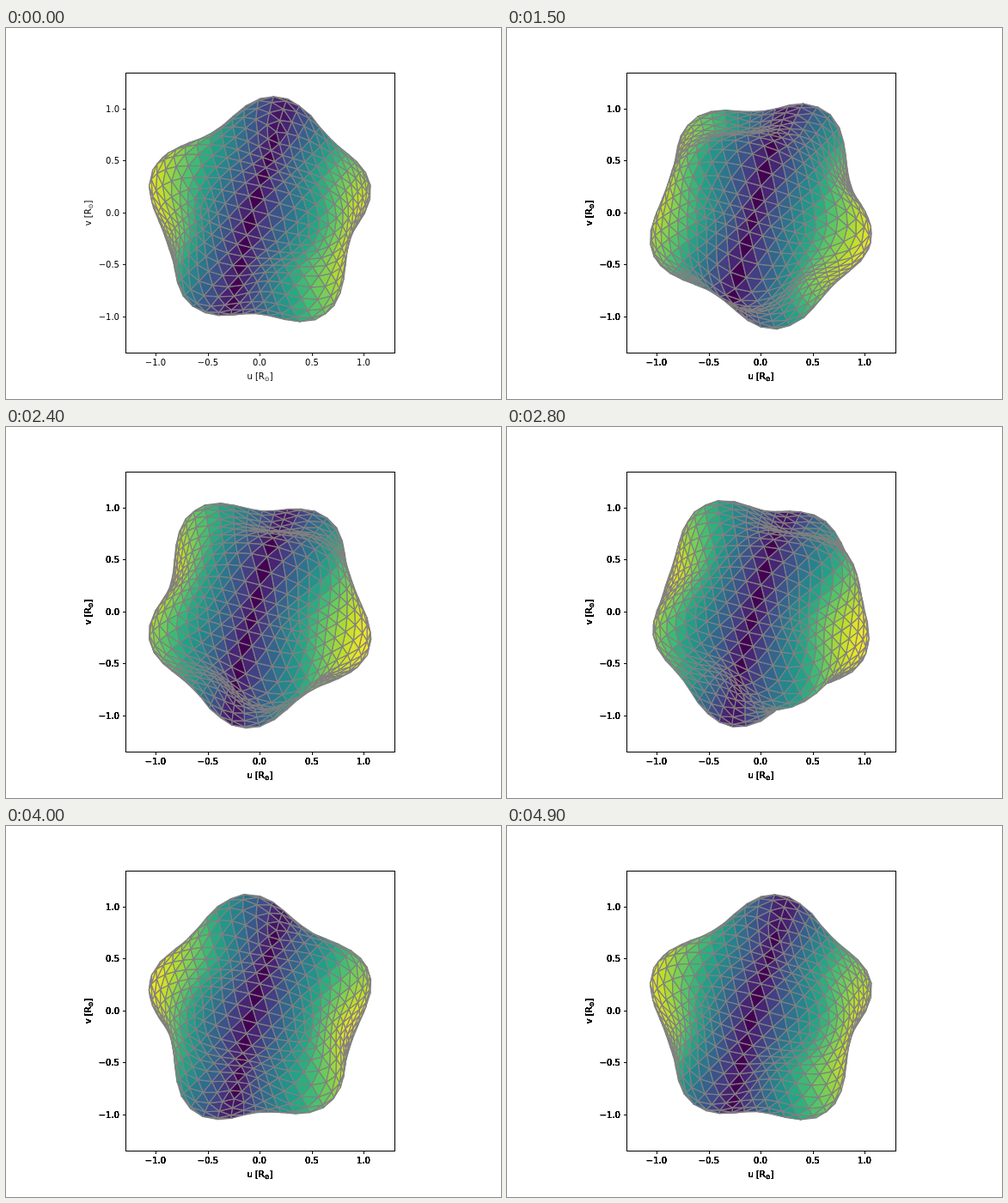
Recreate the animation shown at these times as an HTML page with a canvas. Size 576 by 432 pixels, loop 5 s.

```html
<!DOCTYPE html>
<html lang="en">
<head>
<meta charset="utf-8">
<title>Pulsating star mesh</title>
<style>
  html, body { margin: 0; width: 100%; height: 100%; overflow: hidden; background: #fff; }
  canvas, svg { position: absolute; left: 0; top: 0; width: 576px; height: 432px; }
  text { font: 10px "DejaVu Sans", sans-serif; }
  .sub { font-size: 7px; }
</style>
</head>
<body>
<canvas id="stage" width="576" height="432"></canvas>
<svg viewBox="0 0 576 432">
  <rect x="139.5" y="52.5" width="313" height="326" fill="none" stroke="#000"/>
  <g id="axes">
    <g id="ticks"></g>
    <text x="295.5" y="409" text-anchor="middle">u [R<tspan class="sub" dy="1.6">⊙</tspan><tspan dy="-1.6">]</tspan></text>
    <text transform="translate(99 215.5) rotate(-90)" text-anchor="middle">v [R<tspan class="sub" dy="1.6">⊙</tspan><tspan dy="-1.6">]</tspan></text>
  </g>
  <g id="copies"></g>
</svg>
<script>
const NS = 'http://www.w3.org/2000/svg';
const ctx = document.getElementById('stage').getContext('2d');
const rad = Math.PI / 180, { sin, cos } = Math;

// axis ticks and labels
function add(parent, name, attrs, text) {
  const el = document.createElementNS(NS, name);
  for (const key in attrs) el.setAttribute(key, attrs[key]);
  if (text) el.textContent = text;
  return parent.appendChild(el);
}
const ticks = document.getElementById('ticks');
const tickX = [174.5, 235.5, 295.5, 356.5, 416.5];
const tickY = [336.5, 275.5, 215.5, 154.5, 94.5];
['−1.0', '−0.5', '0.0', '0.5', '1.0'].forEach((label, i) => {
  const x = tickX[i], y = tickY[i];
  add(ticks, 'path', { d: `M${x} 378.5v3.5M139.5 ${y}h-3.5`, stroke: '#000', 'stroke-width': .9 });
  add(ticks, 'text', { x: x - .5, y: 393, 'text-anchor': 'middle' }, label);
  add(ticks, 'text', { x: 132, y: y + 3.5, 'text-anchor': 'end' }, label);
});

// the labels are drawn over themselves, which thickens their soft edges
const copies = Array.from({ length: 6 }, () =>
  add(document.getElementById('copies'), 'use', { href: '#axes', visibility: 'hidden' }));

// sphere mesh in the star's own frame (y is the pulsation axis): a subdivided icosahedron
const TILT = 15 * rad, PITCH = 52.62 * rad, SPLIT = 9;
function corner(lat, lon) {
  lat *= rad; lon *= rad;
  const x = cos(lat) * sin(lon), y0 = sin(lat), z0 = cos(lat) * cos(lon);
  const y = y0 * cos(PITCH) - z0 * sin(PITCH), z = y0 * sin(PITCH) + z0 * cos(PITCH);
  return [x * cos(TILT) + y * sin(TILT), y * cos(TILT) - x * sin(TILT), z];
}
const faces = [];
function split(a, b, c) {
  const at = (i, j) => {
    const p = a.map((v, k) => v + ((b[k] - v) * i + (c[k] - v) * j) / SPLIT);
    const len = Math.hypot(...p);
    return p.map(v => v / len);
  };
  for (let i = 0; i < SPLIT; i++)
    for (let j = 0; i + j < SPLIT; j++) {
      faces.push([at(i, j), at(i + 1, j), at(i, j + 1)]);
      if (i + j < SPLIT - 1) faces.push([at(i + 1, j), at(i + 1, j + 1), at(i, j + 1)]);
    }
}
const north = corner(90, 0), south = corner(-90, 0), RING = 26.565;
for (let k = 0; k < 5; k++) {
  const lon = 72 * k - 36;
  const u0 = corner(RING, lon), u1 = corner(RING, lon + 72);
  const d0 = corner(-RING, lon + 36), d1 = corner(-RING, lon + 108);
  split(north, u0, u1);
  split(u0, d0, u1);
  split(u1, d0, d1);
  split(d0, south, d1);
}

// face colour: distance of the undisturbed face from the tilted meridian plane
const viridis = [[68, 1, 84], [72, 36, 117], [65, 68, 135], [53, 95, 141], [42, 120, 142], [33, 145, 140],
  [34, 168, 132], [68, 191, 112], [122, 209, 81], [189, 223, 38], [253, 231, 37]];
function colour(v) {
  const s = Math.min(v, .9999) * 10, i = Math.floor(s);
  return `rgb(${viridis[i].map((c, k) => Math.round(c + (viridis[i + 1][k] - c) * (s - i)))})`;
}
const fills = faces.map(f => {
  const dist = f.reduce((sum, p) => sum + p[0] * cos(TILT) - p[1] * sin(TILT), 0) / 3;
  return colour(Math.abs(dist) ** .87);
});

// pulsation: spherical harmonic l = 5, m = 2 running round the inclined axis
const INCL = 75 * rad, AMP = .6, SCALE = 121, CX = 295.5, CY = 215.2;
function swell([x, y, z], phase) {
  const wave = (1 - y * y) * (3 * y ** 3 - y) * cos(2 * Math.atan2(x, z) - phase);
  const r = SCALE * (1 + AMP * wave);
  return [
    CX + r * x,
    CY - r * (y * sin(INCL) + z * cos(INCL)),
    r * (z * sin(INCL) - y * cos(INCL))
  ];
}

function draw(step) {
  const phase = (35 + 360 * step / 49) * rad;
  const shown = [];
  faces.forEach((f, i) => {
    const [a, b, c] = f.map(p => swell(p, phase));
    const area = (b[0] - a[0]) * (c[1] - a[1]) - (b[1] - a[1]) * (c[0] - a[0]);
    if (area < 0) shown.push({ a, b, c, z: a[2] + b[2] + c[2], fill: fills[i] });
  });
  shown.sort((p, q) => p.z - q.z);
  ctx.clearRect(0, 0, 576, 432);
  ctx.strokeStyle = '#808080';
  ctx.lineWidth = 1.25;
  ctx.lineJoin = 'round';
  for (const { a, b, c, fill } of shown) {
    ctx.beginPath();
    ctx.moveTo(a[0], a[1]);
    ctx.lineTo(b[0], b[1]);
    ctx.lineTo(c[0], c[1]);
    ctx.closePath();
    ctx.fillStyle = fill;
    ctx.fill();
    ctx.stroke();
  }
  copies.forEach((el, i) => el.setAttribute('visibility', i < step ? 'visible' : 'hidden'));
}

let last = -1;
const start = performance.now();
function tick() {
  const step = Math.floor((performance.now() - start) / 100) % 50;
  if (step !== last) draw(last = step);
  requestAnimationFrame(tick);
}
tick();
</script>
</body>
</html>
```
